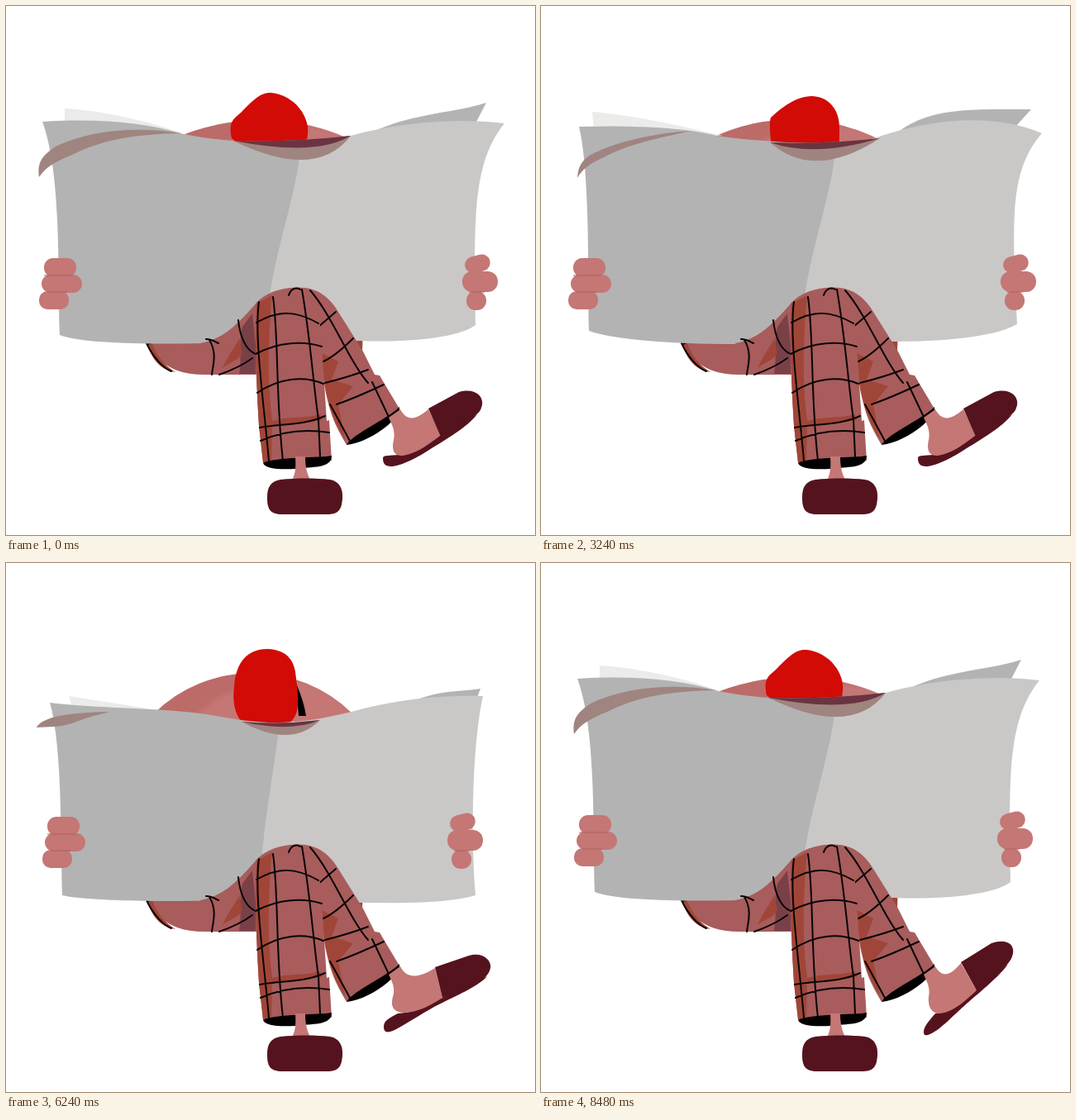
An HTML page that plays this animation: 640 by 640 pixels, repeating every 8520 ms.

```html
<!DOCTYPE html>
<html lang="en">
<head>
<meta charset="utf-8">
<title>Reader behind a newspaper</title>
<style>
html, body { margin: 0; width: 100%; height: 100%; overflow: hidden; background: #fff; }
svg { display: block; width: 100vw; height: 100vh; }
.skin { fill: #c47775; }
.pants { fill: #a85c5c; }
.rust { fill: #a04638; }
.shoe { fill: #55131e; }
.curl { fill: #a08480; }
.shade { fill: #b56563; opacity: .6; }
.line { fill: none; stroke: #080406; stroke-width: 2; stroke-linecap: round; }
</style>
</head>
<body>
<svg viewBox="0 0 640 640">
  <defs>
    <radialGradient id="ball" cx=".62" cy=".5" r=".66">
      <stop offset=".7" stop-color="#c47775"/>
      <stop offset=".74" stop-color="#bc6b69"/>
    </radialGradient>
    <clipPath id="waist"><rect width="640" height="394"/></clipPath>
  </defs>

  <path class="rust" d="M130 292L103 342L132 336ZM450 350L482 346L452 368Z"/>
  <g clip-path="url(#waist)"><ellipse id="body" fill="url(#ball)"/></g>
  <path class="pants" d="M164 358C165 420 190 446 240 446L302 446L420 420L431 418L434 346L300 325Z"/>
  <path class="rust" d="M166 390C172 425 185 440 205 443C185 430 178 415 172 392ZM421 402H431V419L424 416Z"/>
  <path class="line" d="M170 408C178 425 190 438 200 442M172 409C200 393 250 386 288 375M230 338L233 406M265 330L268 354"/>
  <path d="M163 366L196 359L200 388L167 396ZM206 354L262 344L266 372L210 383ZM272 340L284 338L284 368L275 368ZM397 342L404 345L404 372L397 370ZM414 348L433 354L431 376L413 370Z"/>

  <g id="face">
    <path class="skin" d="M99 354C99 335 125 334 150 326L299 270V318L180 357C150 366 132 378 118 378C106 376 100 366 99 354Z"/>
    <path class="skin" d="M397 250L464 297C490 310 497 325 494 340C490 358 470 357 452 350L397 322Z"/>
    <path class="shade" d="M196 236C230 232 262 212 287 184C278 205 274 220 277 236C250 242 220 247 200 244ZM397 285C420 296 440 310 460 334C440 328 420 322 397 318ZM397 212L420 217C415 224 405 224 397 223Z"/>
    <path d="M228 278L291 253L294 260L230 284ZM282 311L299 306V312L285 315Z"/>
    <path class="skin" d="M299 317C288 316 283 325 287 334C281 345 283 363 299 372Z"/>
  </g>

  <path id="tassel"/>
  <path id="hat" fill="#d20b07"/>
  <path id="backLeft" fill="#ebebea"/>
  <path id="backRight" fill="#b3b3b3"/>
  <path id="left" fill="#b3b3b3"/>
  <path id="right" fill="#c9c8c6"/>
  <g id="droop">
    <path fill="#b3b3b3" d="M400 249L600 240L572 262V305H475C455 308 450 325 440 330L410 335C400 320 375 325 366 310C385 292 395 275 400 249Z"/>
    <path class="curl" d="M545 244C565 252 573 262 574 276C585 285 592 292 594 302C601 290 601 275 590 260C580 250 560 246 545 244Z"/>
  </g>
  <path id="leftCurl" class="curl"/>
  <path id="midCurl" class="curl"/>
  <path id="midDark" fill="#6a3440"/>
  <g id="hands" class="skin">
    <g id="handL">
      <rect x="46" y="305" width="39" height="23" rx="11"/>
      <rect x="43" y="325" width="49" height="22" rx="11"/>
      <rect id="tipL" x="40" y="345" width="36" height="22" rx="10"/>
      <path d="M46 326H80M50 346H74" stroke="#ac5f5f"/>
    </g>
    <g id="handR">
      <rect x="555" y="302" width="31" height="20" rx="10" transform="rotate(-14 570 312)"/>
      <rect x="552" y="321" width="43" height="25" rx="12"/>
      <rect id="tipR" x="557" y="345" width="24" height="23" rx="11"/>
      <path d="M560 346H579" stroke="#ac5f5f"/>
    </g>
  </g>

  <path class="pants" d="M235 408C265 402 280 385 304 358V446H250Z"/>
  <path fill="#7a4048" d="M298 372L286 388C281 405 286 425 282 445H302V410Z"/>
  <path class="rust" d="M262 438C272 430 280 430 286 420L282 402C278 412 270 420 262 438Z"/>
  <path class="line" d="M242 403C250 403 254 407 257 408M246 404C256 420 250 436 249 446M258 446C275 440 290 432 298 426M281 380C283 400 290 415 300 420"/>

  <path class="pants" d="M340 342C372 336 390 350 402 370L432 418L446 446L452 447L477 489L412 531C400 510 385 490 378 400Z"/>
  <path class="rust" d="M382 420L402 430L394 452L420 460L402 482L410 524C396 502 385 475 382 420Z"/>
  <path d="M412 531C420 517 460 501 476 485C478 500 440 528 412 531Z"/>
  <path class="line" d="M368 344C395 375 415 430 438 456M378 388L399 370M384 430C395 425 410 412 420 402M386 456C410 450 425 445 438 440M400 482C420 475 440 466 457 458M392 482C402 500 410 515 417 528M443 455L462 495"/>

  <path class="pants" d="M302 360C315 345 338 339 358 341C374 344 378 365 381 395L388 502L391 501L394 550L311 553L306 508C303 460 301 410 302 360Z"/>
  <path class="rust" d="M303 360L322 350C317 400 316 460 322 500L321 552H311L306 508C303 460 301 410 303 360ZM322 502C340 496 360 500 380 494L382 501C360 505 340 506 322 508Z"/>
  <path d="M311 553C325 545 380 547 394 544C394 560 370 557 350 560C330 561 314 560 311 553Z"/>
  <path class="line" d="M323 352C330 400 326 470 335 550M358 343C368 400 372 460 378 500L380 545M306 358C300 400 312 480 318 550M342 350C345 341 352 340 356 343M303 383C330 368 350 368 378 384M302 421C330 406 360 405 382 412M304 468C330 450 360 447 384 457M307 510C330 505 360 508 386 496M308 526C335 514 365 512 391 516"/>
  <path class="skin" d="M350 545H362C362 560 365 568 370 577H344C350 568 351 560 350 545Z"/>
  <path class="shoe" d="M332 573C352 571 375 571 392 573C404 575 408 585 407 596C406 610 402 615 388 615H334C320 615 316 609 316 595C316 582 320 575 332 573Z"/>

  <path id="sole" class="shoe"/>
  <path id="foot" class="skin"/>
  <path id="cap" class="shoe"/>
</svg>
<script>
const LOOP = 8520, STEP = 40;
const el = id => document.getElementById(id);

// Pose order: rest, alert, shut, reopened, peek
const paper = {
  left: [
    'M44,140 C110,136 165,140 215,155 C255,163 310,167 357,165 C356,240 318,330 317,406 C230,409 100,412 65,398 C62,330 68,205 44,140Z',
    'M46,146 C110,144 175,147 213,157 C255,163 310,167 357,166 C356,240 318,330 317,406 C230,413 100,408 58,393 C56,330 60,205 46,146Z',
    'M299,118 C305,110 312,92 325,82 C330,76 336,72 342,70 C342,160 335,260 332,380 C320,380 310,370 300,362 C297,280 298,200 299,118Z',
    'M53,169 C110,176 180,175 235,182 C265,186 290,193 330,193 C328,240 312,330 310,406 C230,411 100,410 68,402 C66,330 68,220 53,169Z',
    'M43,264 C85,272 130,255 185,249 C230,247 260,248 342,250 C335,290 318,330 317,404 C230,409 100,406 60,399 C59,360 62,300 43,264Z'],
  right: [
    'M357,165 C380,166 400,162 417,157 C480,140 550,135 603,142 C564,190 566,260 568,386 C545,404 470,407 428,405 C400,406 350,406 317,406 C310,330 352,240 357,165Z',
    'M357,166 C380,167 395,163 412,157 C470,138 545,128 606,154 C566,200 570,260 576,385 C545,402 480,406 428,406 C400,406 350,406 317,406 C310,330 352,240 357,166Z',
    'M340,71 C350,66 360,62 375,62 C390,62 405,70 405,88 C402,180 400,270 398,372 C390,378 380,380 370,380 C360,380 340,380 331,380 C328,300 340,160 340,71Z',
    'M330,193 C370,192 395,185 418,180 C470,165 530,159 577,161 C564,220 562,330 568,402 C530,413 470,411 428,411 C400,411 350,408 308,406 C306,330 328,240 330,193Z',
    'M330,250 C380,250 420,245 452,244 C500,243 560,242 607,239 C565,265 571,300 570,396 C540,408 470,408 428,407 C400,407 350,406 316,404 C310,340 322,290 330,250Z'],
  backLeft: [
    'M71,124 C110,126 170,138 213,154 L71,141Z',
    'M62,128 C110,132 170,145 220,157 L64,148Z',
    'M320,110 C320,110 325,115 325,115 L320,120Z',
    'M76,161 C100,165 150,172 182,178 L80,174Z',
    'M33,308 C36,300 38,292 43,278 L54,290Z'],
  backRight: [
    'M445,152 C490,130 540,130 581,117 L568,142Z',
    'M430,154 C470,122 520,125 593,125 L574,146Z',
    'M360,110 C365,110 370,110 375,110 L370,120Z',
    'M495,166 C530,153 550,156 574,152 L570,163Z',
    'M500,246 C530,245 560,245 590,244 L570,250Z'],
  leftCurl: [
    'M40,207 C38,190 42,182 60,170 C100,150 160,145 212,154 C160,155 120,160 80,180 C60,188 48,195 40,207Z',
    'M44,208 C45,195 48,188 60,180 C100,160 150,153 182,151 C130,162 100,170 78,182 C60,190 50,197 44,208Z',
    'M300,120 C300,120 300,120 300,120 C300,120 300,120 300,120 C300,120 300,120 300,120 C300,120 300,120 300,120Z',
    'M37,199 C40,192 55,186 70,184 C90,181 110,180 126,180 C100,186 90,190 80,194 C65,199 50,198 37,199Z',
    'M68,340 C52,315 48,290 52,275 C75,262 120,252 158,251 C110,262 95,280 85,300 C78,315 74,330 68,340Z']
};
// start, control and end of the drooping middle edge
const fold = ['275 163 375 212 417 157', '277 165 330 212 410 160', '342 80 342 80 342 80',
  '285 192 345 225 380 190', '282 249 347 311 397 249'];
// left x y, right x y, tilt of the lowest finger
const grip = ['0 0 0 0 0', '-7 0 4 0 0', '240 0 -170 0 0', '4 2 -18 2 0', '4 12 -9 16 45'];

const head = {
  hat: [
    'M273,160 C269,140 275,137 283,130 C300,113 308,104 321,105 C350,108 368,135 365,155 C364,162 363,170 360,175 C330,175 290,175 273,160Z',
    'M279,170 C277,155 276,140 278,135 C290,124 308,109 328,109 C352,110 362,130 361,150 C361,160 361,168 360,173 C330,174 290,175 279,170Z',
    'M242,141 C242,130 243,120 244,111 C258,104 275,99 302,100 C306,104 308,110 309,116 C306,125 302,132 298,136 C280,133 260,137 242,141Z',
    'M285,192 C276,182 274,165 276,150 C278,120 292,104 316,104 C342,105 350,120 351,140 C354,165 356,184 343,193 C325,196 300,196 285,192Z',
    'M274,141 C274,120 276,98 278,79 C290,70 325,69 339,74 C341,85 342,105 343,125 C344,130 344,136 344,139 C325,148 290,148 274,141Z'],
  tassel: [
    'M340,140 C345,145 345,150 345,155 L350,155 C350,150 348,145 340,140Z',
    'M340,140 C345,145 345,150 345,155 L350,155 C350,150 348,145 340,140Z',
    'M302,100 C305,103 306,106 307,116 L309,114 C309,108 307,104 302,100Z',
    'M350,143 C352,155 353,170 354,185 L363,185 C361,170 355,155 350,143Z',
    'M339,77 C346,90 350,110 353,125 L359,126 C359,108 352,86 339,77Z']
};
const ball = ['309 309 213 171', '306 307 200 170', '295 301 168 168', '299 301 170 168', '296 265 160 128'];

// Pose order: rest, raised, falling, stretched
const slipper = {
  sole: [
    'M456,547 C456,543 465,544 475,543 C495,538 510,530 526,519 L570,494 C560,508 530,526 515,535 C500,545 478,557 466,557 C458,557 456,553 456,547Z',
    'M463,567 C463,561 470,553 477,545 C497,543 510,533 526,516 L565,485 C558,497 530,520 515,533 C498,548 480,568 468,571 C464,572 463,571 463,567Z',
    'M457,561 C457,553 465,550 474,545 C495,544 510,535 528,526 L582,500 C575,510 540,526 528,532 C510,540 485,558 468,566 C460,569 457,567 457,561Z',
    'M452,560 C452,553 462,549 472,543 C495,544 515,539 534,533 L598,518 C590,524 550,536 535,541 C515,546 480,562 462,567 C455,568 452,566 452,560Z'],
  foot: [
    'M463,498 L477,488 C485,502 495,502 511,488 L526,519 C510,532 495,542 480,544 C470,545 466,538 469,525 C471,515 468,508 463,498Z',
    'M463,498 L477,488 C485,502 495,500 508,484 L527,517 C510,533 497,544 482,545 C472,545 468,536 469,525 C471,515 468,508 463,498Z',
    'M463,498 L477,488 C485,504 500,502 519,490 L528,526 C510,538 495,544 480,544 C468,543 465,535 468,525 C471,515 468,508 463,498Z',
    'M463,498 L477,488 C485,504 505,505 526,496 L534,533 C515,541 495,544 480,544 C468,543 464,535 467,525 C471,515 468,508 463,498Z'],
  cap: [
    'M511,487 L548,467 C570,461 580,475 575,486 C573,494 565,498 526,521Z',
    'M508,483 L545,460 C565,453 575,463 570,476 C567,485 560,490 527,517Z',
    'M519,489 L560,475 C578,470 588,482 586,490 C584,500 575,510 528,526Z',
    'M526,495 L572,486 C592,482 606,492 604,503 C602,514 592,522 534,533Z']
};

// [time, pose]
const paperKeys = [[0, 0], [2400, 0], [3200, 1], [3560, 1], [4120, 2], [5040, 2], [5480, 1], [5640, 1], [6200, 3],
  [7240, 3], [7680, 4], [8000, 4], [8480, 0], [LOOP, 0]];
const headKeys = [[0, 0], [1960, 0], [2360, 1], [3560, 1], [4080, 2], [5040, 2], [5680, 3],
  [7560, 3], [7720, 4], [8040, 4], [8440, 0], [LOOP, 0]];
const tapKeys = [[0, 0], [280, 0], [440, 1], [560, 1], [640, 2], [720, 3], [800, 0]];

function poseAt(keys, t) {
  const i = keys.findIndex((k, n) => n && t < k[0]);
  const [t0, a] = keys[i - 1], [t1, b] = keys[i];
  const u = (t - t0) / (t1 - t0);
  return { a, b, u: u * u * (3 - 2 * u) };
}

const number = /-?\d+(\.\d+)?/g;
function mix(list, { a, b, u }) {
  const to = list[b].match(number);
  let i = 0;
  return list[a].replace(number, n => (+n + (to[i++] - n) * u).toFixed(2));
}
const values = (list, pose) => mix(list, pose).split(' ').map(Number);
const weight = ({ a, b, u }, pose) => (a === pose) * (1 - u) + (b === pose) * u;

function drawParts(parts, pose) {
  for (const id in parts) el(id).setAttribute('d', mix(parts[id], pose));
}

function drawPaper(pose) {
  drawParts(paper, pose);
  const [x0, y0, cx, cy, x1, y1] = values(fold, pose);
  const flap = y => `M${x0},${y0}Q${cx},${y} ${x1},${y1}Q${(x0 + x1) / 2},${(y0 + y1) / 2 + 5} ${x0},${y0}Z`;
  el('midCurl').setAttribute('d', flap(cy));
  el('midDark').setAttribute('d', flap(y0 + (cy - y0) * .4));
  const [lx, ly, rx, ry, tilt] = values(grip, pose);
  el('handL').setAttribute('transform', `translate(${lx} ${ly})`);
  el('handR').setAttribute('transform', `translate(${rx} ${ry})`);
  el('tipL').setAttribute('transform', `rotate(${tilt} 58 354)`);
  el('tipR').setAttribute('transform', `rotate(${-tilt} 569 356)`);
  const shut = weight(pose, 2);
  el('hands').style.display = shut > .93 ? 'none' : '';
  el('face').style.display = shut > .02 ? '' : 'none';
  el('droop').style.opacity = Math.max(0, weight(pose, 4) * 2 - 1);
}

function drawHead(pose) {
  drawParts(head, pose);
  const size = values(ball, pose);
  ['cx', 'cy', 'rx', 'ry'].forEach((name, i) => el('body').setAttribute(name, size[i]));
}

function draw(ms) {
  const t = Math.floor(ms % LOOP / STEP) * STEP;
  drawPaper(poseAt(paperKeys, t));
  drawHead(poseAt(headKeys, t));
  drawParts(slipper, poseAt(tapKeys, t % 800));
}

let start;
function tick(now) {
  start ??= now;
  draw(now - start);
  requestAnimationFrame(tick);
}
draw(0);
requestAnimationFrame(tick);
</script>
</body>
</html>
```
